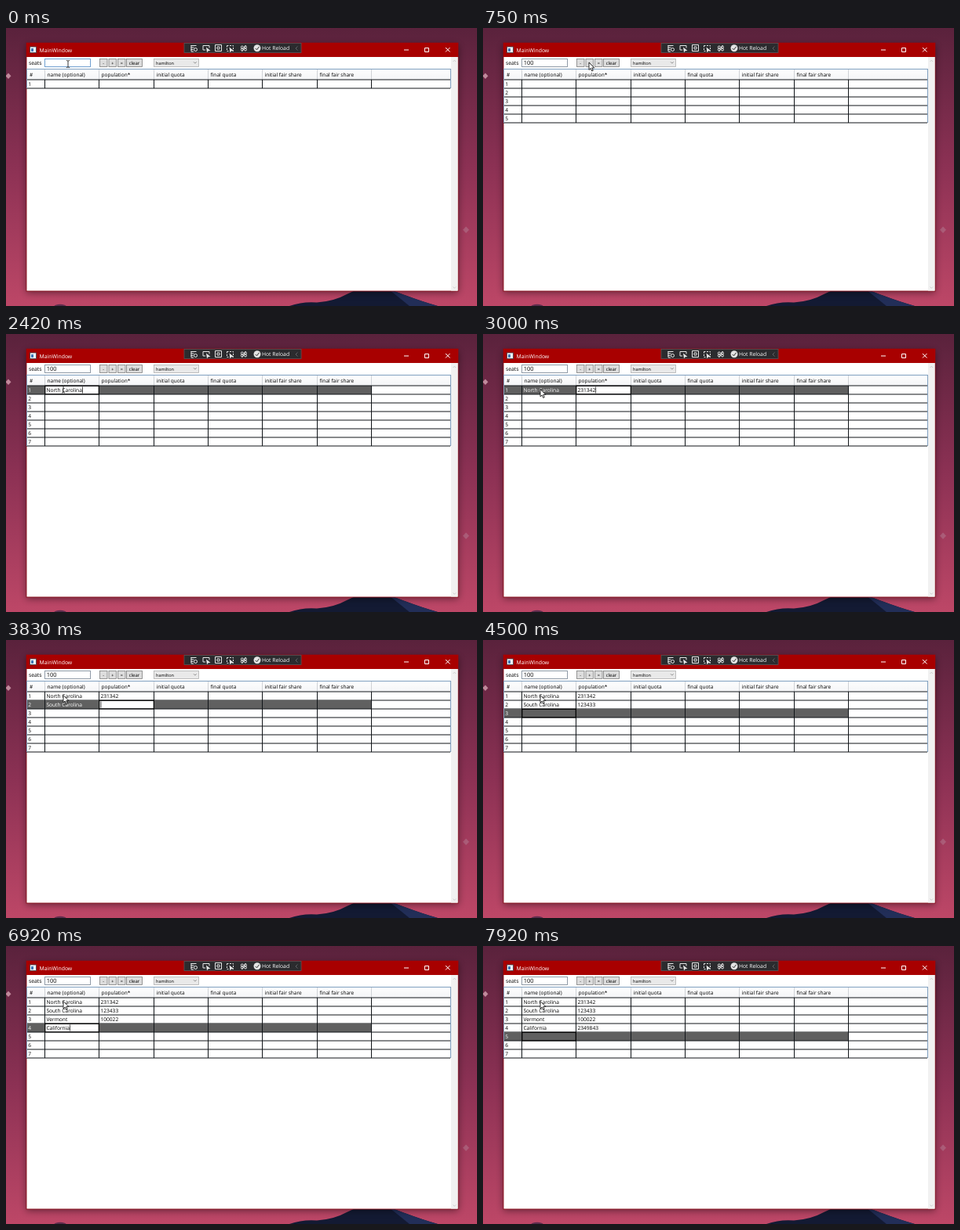
Recreate the animation shown at these times as an HTML page. Size 600 px wide and 355 px high, loop 8000 ms.

```html
<!DOCTYPE html>
<html lang="en">
<head>
<meta charset="utf-8">
<title>Apportionment table</title>
<style>
html, body { margin: 0; width: 100%; height: 100%; overflow: hidden; background: #a63e5e; }
svg { display: block; width: 600px; height: 355px; }
text { font: 6.65px "Open Sans", "Noto Sans", sans-serif; fill: #000; white-space: pre; text-rendering: geometricPrecision; }
.small { font-size: 5.5px; }
.light { fill: #fff; }
.line { stroke: #101418; stroke-width: 1; }
.icon { fill: none; stroke: #e8e8e8; stroke-width: 1; }
.button { fill: #ddd; stroke: #808080; stroke-width: .8; }
</style>
</head>
<body>
<svg id="stage" viewBox="0 0 600 355">
  <defs>
    <linearGradient id="sky" x2="0" y2="1">
      <stop stop-color="#5a223c"/><stop offset=".5" stop-color="#8c3154"/><stop offset="1" stop-color="#bd4767"/>
    </linearGradient>
    <linearGradient id="head" x2="0" y2="1">
      <stop stop-color="#fff"/><stop offset="1" stop-color="#f3f4f6"/>
    </linearGradient>
    <filter id="blur" x="-5%" y="-8%" width="110%" height="116%"><feGaussianBlur stdDeviation="5"/></filter>
  </defs>

  <rect width="600" height="355" fill="url(#sky)"/>
  <path d="M3 57.5l3.5 3.8-3.5 3.8-3.5-3.8z" fill="#c08a9c"/>
  <path d="M586 253.500l4 4.200-4 4.200-4-4.200z" fill="#ab5c78"/>
  <ellipse cx="69" cy="356" rx="8" ry="3.200" fill="#5c2c4c"/>
  <path d="M361 355Q378 349 396 350.500Q418 349 434 340Q452 330 474 331Q490 334 500 338Q528 349 550 355z" fill="#131a33"/>
  <path d="M488 334L500 338Q528 349 550 355H514z" fill="#222e58"/>

  <rect x="26" y="22" width="550" height="316" filter="url(#blur)" opacity=".45"/>
  <rect x="26" y="19" width="550" height="317" fill="#fff" stroke="#8a0c18" stroke-width=".9"/>
  <rect x="26" y="19" width="550" height="18" fill="#a80000"/>
  <rect x="30.500" y="24" width="8" height="7.500" fill="#f4f6f8" stroke="#3c4450" stroke-width=".8"/>
  <rect x="32" y="26" width="3" height="4" fill="#3f78b5"/>
  <text class="light" x="42.500" y="30.500" style="font-size:6.85px">MainWindow</text>
  <path d="M507 28h6M533.500 25.500h5v5h-5zM560 25l5.500 5.500m0-5.500l-5.500 5.500" fill="none" stroke="#fff"/>

  <rect x="227" y="19.500" width="149" height="12" fill="#2b2b2e" stroke="#55555a" stroke-width=".8"/>
  <g class="icon">
    <path d="M235.500 22.500h7M235.500 25h4M235.500 27.500h3M236 22v8h3"/><circle cx="241.500" cy="27.500" r="2"/>
    <path d="M254 28h-3v-5.500h8v3"/><path d="M255 24.500l5.500 4.500-2.800.3-1.700 2z" fill="#e8e8e8" stroke="none"/>
    <path d="M266.500 21.500h8v8h-8zM269 24h3v3h-3z"/>
    <path d="M281.500 22.500h8v7h-8z" stroke-dasharray="2 1.500"/><path d="M284.500 24.500l5.500 4.500-2.800.3-1.700 2z" fill="#e8e8e8" stroke="none"/>
    <circle cx="300.800" cy="24.500" r="1.500"/><circle cx="300.800" cy="27.500" r="1.500"/>
    <circle cx="305" cy="24.500" r="1.500"/><circle cx="305" cy="27.500" r="1.500"/><path d="M305.500 22l-5 8"/>
    <path d="M371.500 23.500l-2.500 2.500 2.500 2.500" stroke="#77777b" stroke-width=".7"/>
  </g>
  <circle cx="320" cy="25.800" r="4.500" fill="#e4e4e4"/>
  <path d="M317.800 26l1.700 1.800 3-4" fill="none" stroke="#333" stroke-width="1"/>
  <text class="light" x="326" y="28.200" style="font-size:6.8px">Hot Reload</text>

  <text x="29" y="47.200" style="font-size:6.8px">seats</text>
  <rect id="seatBox" x="49.500" y="39.500" width="58" height="10" fill="#fff" stroke-width="1"/>
  <text id="seats" x="51.700" y="47.200" style="font-size:7.4px"></text>
  <g class="button">
    <rect x="119.500" y="39.500" width="9.500" height="10"/><rect x="131" y="39.500" width="9.500" height="10"/>
    <rect x="142.500" y="39.500" width="9.500" height="10"/><rect x="153.500" y="39.500" width="20" height="10"/>
    <rect x="188.500" y="39.500" width="57" height="10" fill="#e9e9e9" stroke="#b0b0b0"/>
  </g>
  <text class="small" x="123.300" y="46.500">-</text><text class="small" x="134.200" y="46.500">+</text>
  <text class="small" x="145.700" y="46.500">=</text><text x="156.700" y="46.700" style="font-size:6px">clear</text>
  <text class="small" x="191" y="46.700">hamilton</text>
  <path d="M239 43.300l1.800 1.800 1.800-1.800" fill="none" stroke="#666" stroke-width=".7"/>

  <rect x="567" y="37" width="8.500" height="298.500" fill="#f1f1f1"/>
  <path d="M569.500 43l1.800-1.800 1.800 1.800M569.500 330.500l1.800 1.800 1.800-1.800" fill="none" stroke="#c4c4c4" stroke-width=".8"/>

  <rect x="26" y="52" width="540" height="14" fill="url(#head)"/>
  <g id="headers"></g>
  <g id="rows"></g>
  <path id="frame" fill="none" stroke="#7f9fbf" shape-rendering="crispEdges"/>
  <rect id="cell" stroke="#000" stroke-width="1.2"/>
  <g id="entries"></g>
  <rect id="caret" width=".7" height="8.200" fill="#000"/>
  <path id="arrow" d="M0 0v9.500l2.200-2 1.500 3.500 1.600-.7-1.500-3.400h3z" fill="#fff" stroke="#000" stroke-width=".8"/>
  <path id="beam" d="M-2-4.500q2 0 2 1q0-1 2-1M0-3.500v7M-2 4.500q2 0 2-1q0 1 2 1" fill="none" stroke="#222" stroke-width=".9"/>
</svg>
<script>
const LOOP = 8000, FPS = 12, TOP = 66, ROW = 11, BASELINE = 8.2;
const columns = [26, 49, 118, 188, 257, 326, 396, 465, 566];
const titles = ['#', 'name (optional)', 'population*', 'initial quota', 'final quota', 'initial fair share', 'final fair share'];

// Text typed into each cell: row, column, first key, last key
const entries = [
  ['North Carolina', 0, 1, 1670, 2400], ['231342', 0, 2, 2580, 3000],
  ['South Carolina', 1, 1, 3160, 3740], ['123433', 1, 2, 3910, 4410],
  ['Vermont', 2, 1, 4750, 5090], ['100022', 2, 2, 5250, 5660],
  ['California', 3, 1, 6170, 6910], ['2349843', 3, 2, 7130, 7680]
];
// Selected cell: time, row, column, whether it is being edited
const focus = [
  [1330, 0, 1, false], [1500, 0, 1, true], [2500, 0, 2, true],
  [3080, 1, 1, false], [3160, 1, 1, true], [3820, 1, 2, true],
  [4500, 2, 1, false], [4750, 2, 1, true], [5170, 2, 2, true],
  [6000, 3, 1, false], [6170, 3, 1, true], [7000, 3, 2, true],
  [7830, 4, 1, false]
];
const pointer = [[0, 79, 46], [300, 79, 46], [500, 135, 44], [920, 135, 44], [1170, 73, 70.500]];

const $ = id => document.getElementById(id);
const set = (node, attrs) => { for (const k in attrs) node.setAttribute(k, attrs[k]); return node; };
const add = (parent, tag, attrs, label = '') => {
  const node = set(document.createElementNS('http://www.w3.org/2000/svg', tag), attrs);
  node.textContent = label;
  return parent.appendChild(node);
};
const show = (node, on) => node.style.display = on ? '' : 'none';
const vertical = (parent, x, y, h, color) =>
  add(parent, 'path', { d: `M${x + .5} ${y}v${h}`, class: 'line', style: color ? `stroke:${color}` : '' });

titles.forEach((title, i) => {
  add($('headers'), 'text', { x: columns[i] + (i ? 3.500 : 4), y: 62.200, style: 'font-size:6.55px' }, title);
  vertical($('headers'), columns[i + 1], 53, 13, '#cfd2d6');
});

const rows = Array.from({ length: 7 }, (_, i) => {
  const y = TOP + i * ROW, group = add($('rows'), 'g', {});
  const fill = add(group, 'rect', { x: 26, y, width: 440, height: ROW, fill: '#606060' });
  add(group, 'path', { d: `M26 ${y + ROW}H566`, class: 'line' });
  columns.slice(1, -1).forEach(x => vertical(group, x, y, ROW));
  const number = add(group, 'text', { x: 28.300, y: y + BASELINE }, i + 1);
  return { group, fill, number };
});
add($('rows'), 'path', { d: `M26 ${TOP}H566`, class: 'line' });
const labels = entries.map(([, row, col]) =>
  add($('entries'), 'text', { x: columns[col] + 2.400, y: TOP + row * ROW + BASELINE }));

function typed(text, start, end, t) {
  if (t < start) return '';
  return text.slice(0, 1 + Math.floor((t - start) / (end - start) * (text.length - 1)));
}

function pointerAt(t) {
  const i = pointer.findIndex(p => p[0] > t);
  if (i < 0) return pointer.at(-1).slice(1);
  const [t0, x0, y0] = pointer[i - 1], [t1, x1, y1] = pointer[i];
  const u = (t - t0) / (t1 - t0), ease = u * u * (3 - 2 * u);
  return [x0 + (x1 - x0) * ease, y0 + (y1 - y0) * ease];
}

function draw(t) {
  const [, row, col, editing] = focus.findLast(f => f[0] <= t) || [0, -1, 0, false];
  const count = Math.max(1, Math.min(7, 2 + Math.floor((t - 500) / 80)));
  const bottom = TOP + count * ROW;

  $('seats').textContent = typed('100', 80, 250, t);
  set($('seatBox'), { stroke: t < 500 ? '#6f9fd0' : '#8f9aa6' });

  rows.forEach(({ group, fill, number }, i) => {
    show(group, i < count);
    show(fill, i === row);
    number.style.fill = i === row ? '#fff' : '';
  });
  set($('frame'), { d: `M26.500 ${bottom}V52.500H566.500V${bottom}` });

  show($('cell'), row >= 0);
  if (row >= 0) set($('cell'), {
    x: columns[col] + .8, y: TOP + row * ROW + .3,
    width: columns[col + 1] - columns[col] - .5, height: ROW - .5,
    fill: editing ? '#fff' : '#606060'
  });

  let caretX = columns[col] + 2.600;
  entries.forEach(([text, r, c, start, end], i) => {
    const active = r === row && c === col && editing;
    labels[i].textContent = typed(text, start, end, t);
    labels[i].style.fill = r === row && !active ? '#fff' : '';
    if (active && labels[i].textContent) caretX += labels[i].getComputedTextLength();
  });
  show($('caret'), editing);
  set($('caret'), { x: caretX, y: TOP + row * ROW + 1.400 });

  const [x, y] = pointerAt(t);
  const overText = t < 320 || (editing && row === 0 && col === 1);
  show($('beam'), overText);
  show($('arrow'), !overText);
  set($('beam'), { transform: `translate(${x} ${y})` });
  set($('arrow'), { transform: `translate(${x} ${y})` });
}

const began = performance.now();
function tick() {
  const t = (performance.now() - began) % LOOP;
  draw(Math.floor((t + 5) * FPS / 1000) * 1000 / FPS + 5);
  requestAnimationFrame(tick);
}
tick();
</script>
</body>
</html>
```
